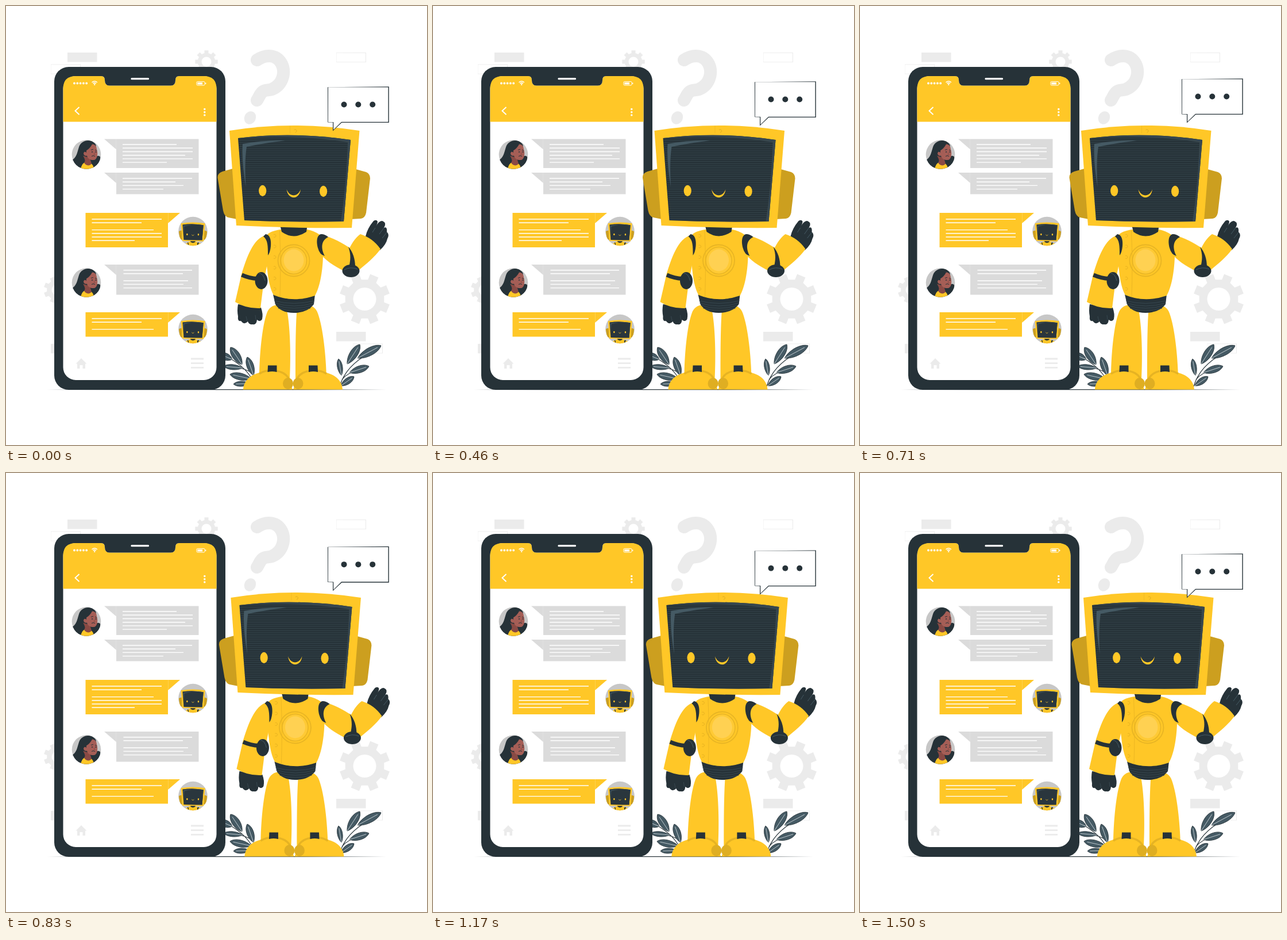
These frames come from a looping animation (733x764 px, 1.54 s). An HTML page:

```html
<!DOCTYPE html>
<html lang="en">
<head>
<meta charset="utf-8">
<title>Chat robot</title>
<style>
html, body { margin: 0; width: 100%; height: 100%; overflow: hidden; background: #fff; }
svg { display: block; width: 100%; height: 100%; }
.y { fill: #ffc727; }
.d { fill: #263238; }
.o { fill: #cc9f1f; }
.g { fill: #ebebeb; }
.s { fill: none; stroke: #dfac20; stroke-width: 1; }
.w { fill: none; stroke: #fff; }
</style>
</head>
<body>
<svg viewBox="0 0 733 764" xmlns="http://www.w3.org/2000/svg">
<defs>
  <linearGradient id="floor">
    <stop offset="0" stop-color="#263238" stop-opacity="0"/>
    <stop offset=".25" stop-color="#263238"/>
    <stop offset=".75" stop-color="#263238"/>
    <stop offset="1" stop-color="#263238" stop-opacity="0"/>
  </linearGradient>
  <pattern id="scan" width="40" height="3.7" patternUnits="userSpaceOnUse">
    <rect width="40" height=".8" fill="#37474f"/>
  </pattern>
  <clipPath id="disc"><circle r="25.3"/></clipPath>

  <g id="woman">
    <circle r="25.3" fill="#c7c7c7"/>
    <g clip-path="url(#disc)">
      <path class="d" d="M-26 10C-17 6-16-4-13-13C-9-25 6-28 14-20C18-17 17-13 15-11L10 8L24 12L26 26H-26Z"/>
      <path class="d" d="M10 10C13 3 21 0 24 4L26 24H8Z"/>
      <path class="y" d="M-10 26C-9 19-6 15-3 14L9 16C12 19 13 22 13 26Z"/>
      <path d="M-6 2L6 6L9 16C5 21-2 19-4 14C-1 11-3 7-6 2Z" fill="#8a4a44"/>
      <path d="M0-7C4-9 8-14 10-18C14-18 18-15 18-9C20-4 20 6 15 9C9 11 2 8 1 2C-2 3-5 1-5-2C-4-6-1-5 0-3Z" fill="#a55e56"/>
      <path d="M8-8l4-1M15-8l3 1M9 3q3-2 6 0" fill="none" stroke="#263238" stroke-width="1"/>
      <circle class="d" cx="10" cy="-4.5" r="1"/><circle class="d" cx="16.5" cy="-4.5" r="1"/>
      <path d="M13-4l2 4-3 0" fill="none" stroke="#8a4a44" stroke-width=".8"/>
    </g>
  </g>

  <g id="robot">
    <!-- legs and feet -->
    <path class="y" d="M441 648C441 608 446 557 454 535C460 516 485 515 490 534C495 565 496 610 494 650Z"/>
    <path class="y" d="M504 650C504 610 504 566 506 534C511 515 537 516 543 535C552 560 557 608 558 648Z"/>
    <path class="y" d="M413 667.5C414 651 427 640 446 637.5C470 633 489 641 495 656L499 667.5Z"/>
    <path class="y" d="M586 667.5C585 651 572 640 553 637.5C529 633 510 641 504 656L500 667.5Z"/>
    <path d="M441 640C455 631 483 632 492 648M558 640C544 631 516 632 507 648" fill="none" stroke="#e6b323" stroke-width="3.5"/>
    <path class="d" d="M456 625.5h15.500v11.500q-8-2-16 0zM527 625.500h15.500l.5 11.500q-8-2-16 0z"/>
    <ellipse cx="491" cy="657" rx="9" ry="10" fill="#dfae22"/>
    <ellipse cx="508.500" cy="657" rx="9" ry="10" fill="#dfae22"/>
    <!-- waist and torso -->
    <path class="d" d="M465 502Q501 514 538 502L536 519Q525 534 501 534Q478 534 469 519Z"/>
    <path d="M467 513Q501 522 537 513M468 517Q501 527 536 517M470 521Q501 531 534 521M474 526Q501 534 530 526" fill="none" stroke="#37474f"/>
    <path class="y" d="M478 389C465 391 458 394 455 398C450 415 452 438 455 460C457 480 461 495 466 503Q501 517 538 504C546 490 551 465 552 436L546 398Q536 391 524 389Z"/>
    <path class="s" d="M476.500 391Q479 450 477 506" opacity=".6"/>
    <g id="rivets" class="s" opacity=".8"></g>
    <circle cx="501" cy="443" r="27.500" fill="none" stroke="#e8b524" stroke-width="1.800"/>
    <ellipse cx="501" cy="443" rx="22.500" ry="23.500" fill="#ffca35" stroke="#e8b524" stroke-width="1.500"/>
    <ellipse cx="501" cy="442.500" rx="17.500" ry="19" fill="#ffd152"/>
    <path class="d" d="M477.500 383H524.500L523 393Q501 408 480 393Z"/>
    <!-- lowered arm -->
    <path class="d" d="M404 519L444 525Q448 536 446 545Q443 551 437 546Q436 556 429 554Q423 555 421 549Q415 556 409 548Q403 550 404 540Q402 530 404 519Z"/>
    <path d="M420 549l-2-9M435 546l-1-8" stroke="#37474f"/>
    <path class="y" d="M452 399C430 405 419 438 410 467L399 515Q418 527 443 526L449 478C455 450 460 425 459 402Z"/>
    <path class="d" d="M452 397C460 398 462 408 461 418Q460 429 456 434C456 418 456 407 448 401Z"/>
    <path d="M410.500 468Q424 474 438 474.500" fill="none" stroke="#263238" stroke-width="7"/>
    <ellipse class="d" cx="444.500" cy="478" rx="11" ry="15"/>
    <path d="M440 465q8 0 11 13" fill="none" stroke="#455a64"/>
    <!-- raised arm -->
    <path class="d" d="M626 401Q629 387 640 374Q645 371 647 375Q647 379 643 385Q651 371 657 375Q663 378 658 386Q664 383 663 393Q668 398 664 405Q662 415 651 425Z"/>
    <path d="M643 386l-5 8M658 386l-8 11M663 394l-8 10" stroke="#455a64"/>
    <path class="y" d="M550 399C569 402 587 414 599 421L613 458L588 461C570 452 556 442 548 432Z"/>
    <path class="d" d="M549 397C541 398 540 410 543 421Q546 433 555 435C549 424 547 409 561 402Q555 397 549 397Z"/>
    <path class="y" d="M596 426C603 410 611 401 617 397Q639 404 652 423C642 437 627 449 614 460Z"/>
    <path class="d" d="M596 419C601 433 600 442 597 455H608C608 440 604 428 596 419Z"/>
    <ellipse class="d" cx="600.500" cy="461" rx="15" ry="11"/>
    <path d="M589 459q11-6 23-1" fill="none" stroke="#455a64"/>
    <!-- head -->
    <path class="o" d="M395 283L377 288Q368 291 368.500 299L378 356Q380 366 387 368L402 371ZM609 284L627 289Q634 292 634 300L627 360Q625 369 618 370L600 371Z"/>
    <path class="y" d="M389 217Q500 199 615.500 217L602 386Q500 387 401 382Z"/>
    <path d="M404 230Q500 218 600 233L588 375Q500 377 415 373Z" class="d"/>
    <path d="M404 230Q500 218 600 233L588 375Q500 377 415 373Z" fill="url(#scan)"/>
    <path d="M600 233L588 375L583 374.500Q593 310 595 237Q500 223 404 230Q500 218 600 233Z" fill="#37474f"/>
    <path d="M412 240Q448 233 486 234Q447 239 419 245Q415 270 417.500 315Q410 270 412 240Z" fill="#455a64"/>
    <ellipse class="y" cx="446.700" cy="321.500" rx="6.600" ry="9.700"/>
    <ellipse class="y" cx="552.600" cy="322.500" rx="6.600" ry="9.700"/>
    <path class="y" d="M488.500 319C491 338 511 338 513 319C508 333 494 333 488.500 319Z"/>
    <path class="s" d="M494.500 208.500V222" opacity=".4"/>
    <path class="s" d="M501.500 216a2.500 2.500 0 1 1 2 4"/>
  </g>
</defs>

<rect width="733" height="764" fill="#fff"/>
<g id="back">
  <path class="g" d="M107 81h51.500v16.500H107zM575 567h51.500v16.500H575zM78 588h30v16.500H78z"/>
  <g id="frames" class="g" fill-rule="evenodd"></g>
  <path d="M437 94C452 84 470 84 479 99C488 115 482 137 463 145C457 147 450 146 447 149C442 153 441 158 437 164" fill="none" stroke="#ebebeb" stroke-width="22" stroke-linecap="round"/>
  <ellipse class="g" cx="425" cy="194.500" rx="10" ry="11.500" transform="rotate(25 425 194.500)"/>
</g>
<rect x="72" y="667" width="590" height="1.200" fill="url(#floor)"/>
<g id="plants"></g>

<!-- phone -->
<rect class="d" x="84" y="106" width="298" height="562" rx="25"/>
<rect x="99.500" y="122" width="267" height="529" rx="22" fill="#fff"/>
<path class="y" d="M99.500 201.500V144Q99.500 122 121.500 122H166Q172 122 172 129Q172 138.500 180 138.500H287Q295 138.500 295 129Q295 122 301 122H344.500Q366.500 122 366.500 144V201.500Z"/>
<path class="d" d="M164 121H303V122H301Q295 122 295 129Q295 138.500 287 138.500H180Q172 138.500 172 129Q172 122 166 122H164Z"/>
<path class="w" d="M219 126.700H247.500" stroke-width="3.200" stroke-linecap="round"/>
<g id="dots" fill="#fff"></g>
<path class="w" d="M149.500 133q4.700-4 9.400 0M151.500 135q2.700-2.300 5.400 0" stroke-width="1.500"/>
<circle cx="154.200" cy="136.800" r="1.200" fill="#fff"/>
<rect class="w" x="332" y="131.500" width="14" height="6.500" rx="1.500"/>
<path d="M333.500 133h8.500v3.500h-8.500zM347 133.500h1.300v2.500h-1.300z" fill="#fff"/>
<path class="w" d="M127.500 176L120.500 182.500L127.500 189" stroke-width="1.900"/>
<g id="chat"></g>
<path class="g" d="M121.500 622.500L131 613L140.500 622.500H138V631H133.500V625H128.500V631H124V622.500Z"/>
<path d="M322 614H344M322 621.700H344M322 629.300H344" stroke="#ebebeb" stroke-width="2.800"/>
<use href="#woman" x="140" y="258.500"/>
<use href="#woman" x="140" y="481.500"/>
<g id="bots"></g>

<g id="body"><use href="#robot"/></g>
<g id="talk">
  <path class="d" d="M560 141.200L666.800 140.200V203H584.500L569 217.500V202.600L560.200 202.400Z"/>
  <path fill="#fff" d="M561 141.300L665.400 141.400V201.700H584L570.200 215.300V201.900H561Z"/>
  <g class="d"><circle cx="588.500" cy="171.500" r="5"/><circle cx="613.300" cy="171.500" r="5"/><circle cx="638.200" cy="171.500" r="5"/></g>
</g>
</svg>
<script>
const $ = id => document.getElementById(id);
const add = (id, markup) => $(id).insertAdjacentHTML('beforeend', markup);

// Gear with eight teeth and a round hole
function gear(cx, cy, r, hole, turn) {
  const pts = [];
  for (let i = 0; i < 8; i++) {
    for (const [a, k] of [[-13, .77], [-10, 1], [10, 1], [13, .77]]) {
      const w = (i * 45 + a + turn) * Math.PI / 180;
      pts.push((cx + r * k * Math.cos(w)).toFixed(1) + ' ' + (cy + r * k * Math.sin(w)).toFixed(1));
    }
  }
  add('back', `<path class="g" d="M${pts.join('L')}Z"/><circle cx="${cx}" cy="${cy}" r="${hole}" fill="#fff"/>`);
}
gear(349, 97, 20, 8.5, 0);
gear(624.5, 510, 44.5, 20, 22.5);
gear(89, 494, 23.5, 9.5, 22.5);

// Thin box whose outline tapers towards one corner
for (const [x, y] of [[78, 101.5], [575, 81], [604, 587.5]])
  add('frames', `<path d="M${x} ${y}h52v17h-52zM${x + .4} ${y + .8}v15.500h50.500v-15.200z"/>`);

function leaf(x1, y1, x2, y2, w) {
  const len = Math.hypot(x2 - x1, y2 - y1);
  const a = Math.atan2(y2 - y1, x2 - x1) * 180 / Math.PI;
  const l = k => (len * k).toFixed(1);
  return `<g transform="translate(${x1} ${y1}) rotate(${a.toFixed(1)})">
    <path d="M0 0C${l(.3)} ${-w} ${l(.8)} ${-w} ${l(1)} 0C${l(.8)} ${w} ${l(.3)} ${w} 0 0Z" fill="#455a64" stroke="#263238" stroke-width=".8"/>
    <path d="M0 0H${l(.85)}" stroke="#cfd8dc" stroke-width=".8"/></g>`;
}
const stem = d => `<path d="${d}" fill="none" stroke="#263238" stroke-width="1.200"/>`;
add('plants', stem('M581 662C588 638 604 620 634 603M585 650Q596 637 612 635M583 660L594 651') +
  stem('M434 662C426 638 408 622 382 609M424 636Q408 628 390 628M428 650Q412 643 396 645') +
  [[594, 623, 616, 589, 9], [612, 613, 653, 591, 9], [584, 643, 579, 614, 6], [598, 638, 632, 627, 8], [583, 661, 606, 645, 7],
   [411, 624, 391, 594, 9], [394, 615, 372, 606, 8], [431, 643, 420, 611, 8], [412, 630, 379, 627, 6], [427, 649, 390, 641, 8], [425, 657, 396, 658, 6]]
    .map(p => leaf(...p)).join(''));

for (let i = 0; i < 5; i++) add('dots', `<circle cx="${119 + i * 5.3}" cy="134.500" r="1.900"/>`);
for (let i = 0; i < 3; i++) add('dots', `<circle cx="345.800" cy="${179.5 + i * 5.2}" r="1.700"/>`);
for (let i = 0; i < 6; i++) add('rivets', `<path d="M466 ${398 + i * 18.5}a2.500 2.500 0 1 1 0 4"/>`);

// Chat message: top, height, side, line start, [row offset, line end] pairs
function message(y, h, bot, x, rows) {
  const left = bot ? 138.5 : 192;
  const tail = bot ? `M282.200 ${y}H303L282.200 ${y + 18}Z` : `M191.800 ${y}H171L191.800 ${y + 18}Z`;
  const lines = rows.map(([dy, end]) => `M${x} ${y + dy}H${end}`).join('');
  add('chat', `<g fill="${bot ? '#ffc727' : '#dbdbdb'}"><rect x="${left}" y="${y}" width="143.500" height="${h}"/><path d="${tail}"/></g>
    <path class="w" d="${lines}" stroke-width="1.400"/>`);
}
message(231.5, 50.5, 0, 203, [[9.5, 297], [15.8, 325], [22, 325], [28.2, 312], [34.4, 325], [40.6, 280]]);
message(290, 37.5, 0, 203, [[10, 324], [16.2, 295], [22.4, 309], [28.6, 274]]);
message(360, 60, 1, 149.5, [[11, 271], [17.2, 236], [29.6, 257], [35.8, 271], [42, 271], [48.2, 224]]);
message(450, 52.5, 0, 204.5, [[9.7, 324], [15.8, 308], [28.2, 317], [34.4, 309], [40.6, 324]]);
message(533, 42.5, 1, 149.5, [[11, 271], [17.2, 236], [29.6, 257]]);

for (const y of [392, 562])
  add('bots', `<g transform="translate(325.500 ${y})"><circle r="25.300" fill="#c7c7c7"/>
    <g clip-path="url(#disc)"><use href="#robot" transform="translate(0 1) scale(.185) translate(-501.500 -297)"/></g></g>`);

// Shake positions at every tenth of the cycle
const shake = [0, -1, 2, -4, 4, -4, 4, -4, 2, -1, 0];
const LOOP = 1540, CYCLE = 1500, STEP = 1000 / 24, UNIT = 1.48;

function draw(ms) {
  const tick = Math.min(36, Math.floor((ms % LOOP + 5) / STEP));
  const p = (tick * STEP + 20) % CYCLE / CYCLE;
  const i = Math.floor(p * 10), f = p * 10 - i;
  const dx = UNIT * (shake[i] + (shake[i + 1] - shake[i]) * f) + .2;
  const dy = -10 * UNIT * (1 - Math.abs(1 - 2 * p)) + .4;
  $('body').setAttribute('transform', `translate(${dx.toFixed(2)} 0)`);
  $('talk').setAttribute('transform', `translate(0 ${dy.toFixed(2)})`);
}

let start = null;
function loop(now) {
  if (start === null) start = now;
  draw(now - start);
  requestAnimationFrame(loop);
}
draw(0);
requestAnimationFrame(loop);
</script>
</body>
</html>
```
